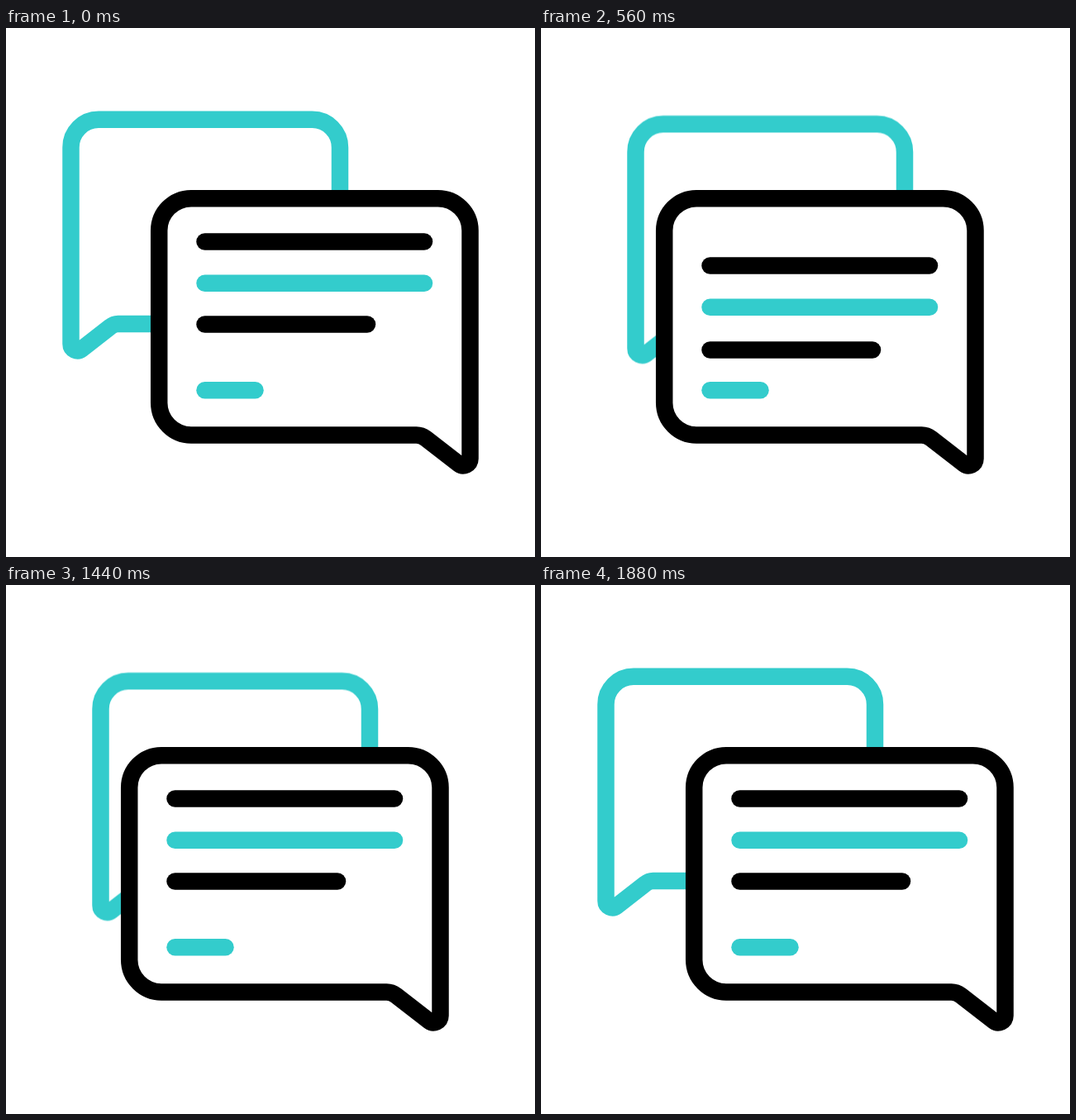
These frames come from a looping animation (640 by 640 pixels, 2 s). An HTML page without scripts:

```html
<!DOCTYPE html>
<html lang="en">
<head>
<meta charset="utf-8">
<title>Chat bubbles</title>
<style>
html, body { margin: 0; width: 100%; height: 100%; overflow: hidden; background: #fff; }
svg { display: block; width: 100vw; height: 100vh; }
path { fill: none; stroke: #000; stroke-width: 20.5; stroke-linecap: round; stroke-linejoin: round; }
.teal { stroke: #3cc; }
.bubble { fill: #fff; }

g, .line { animation: 2s cubic-bezier(.33, 0, .67, 1) infinite; }

/* Sideways slide; each bubble sets its own distance */
.slide { animation-name: slide; }
.back { --shift: translate(36px, 5.5px); }
.front { --shift: translate(-36px, 0); }
@keyframes slide {
  0%, 8%, 90%, 100% { transform: none; }
  24%, 74% { transform: var(--shift); }
}

/* Swing around the tail tip */
.swing-back { transform-origin: 78.5px 390px; animation-name: swing-back; }
.swing-front { transform-origin: 561.5px 529.5px; animation-name: swing-front; }
@keyframes swing-back {
  0%, 4%, 24%, 74%, 94%, 100% { transform: rotate(0deg); }
  12.5% { transform: rotate(8.2deg); }
  20% { transform: rotate(-5deg); }
  78% { transform: rotate(-5.2deg); }
  86% { transform: rotate(8.2deg); }
}
@keyframes swing-front {
  0%, 4%, 24%, 74%, 94%, 100% { transform: rotate(0deg); }
  12.5% { transform: rotate(-5.5deg); }
  20% { transform: rotate(7.6deg); }
  78% { transform: rotate(8.8deg); }
  86% { transform: rotate(-5.4deg); }
}

/* Lines drop in turn, rise in reverse, then ripple upwards */
.l1 { animation-name: l1; }
.l2 { animation-name: l2; }
.l3 { animation-name: l3; }
.l4 { animation-name: l4; }
@keyframes l1 {
  0%, 4%, 54%, 100% { transform: translateY(0); }
  12%, 41% { transform: translateY(29px); }
  48% { transform: translateY(-10.3px); }
}
@keyframes l2 {
  0%, 12%, 41.5%, 48.5%, 60.5%, 100% { transform: translateY(0); }
  20%, 34.5% { transform: translateY(29px); }
  54.5% { transform: translateY(-10.3px); }
}
@keyframes l3 {
  0%, 20%, 35%, 53.5%, 66%, 100% { transform: translateY(0); }
  28% { transform: translateY(31px); }
  60% { transform: translateY(-10.3px); }
}
@keyframes l4 {
  0%, 58.5%, 72%, 100% { transform: translateY(0); }
  65% { transform: translateY(-10.3px); }
}
</style>
</head>
<body>
<svg viewBox="0 0 640 640">
  <g class="slide back">
    <g class="swing-back">
      <path class="bubble teal" d="M112 110.8H370.5A33.5 33.5 0 0 1 404 144.5V324.5A33.5 33.5 0 0 1 370.5 358H135.5Q130.5 358 126 361.7L91.4 388.6A8 8 0 0 1 78.5 382.3V144.5A33.5 33.5 0 0 1 112 110.8Z"/>
    </g>
  </g>
  <g class="slide front">
    <g class="swing-front">
      <path class="bubble" d="M224 206.2H522.5A39 39 0 0 1 561.5 245V521A8.4 8.4 0 0 1 548 527.6L508 496.6Q502.5 492.4 496.5 492.4H224A39 39 0 0 1 185.2 453.5V245A39 39 0 0 1 224 206.2Z"/>
      <path class="line l1" d="M240.5 258.5H506"/>
      <path class="line l2 teal" d="M240.5 308.7H506"/>
      <path class="line l3" d="M240.5 358.5H437"/>
      <path class="line l4 teal" d="M240.5 438.2H301.5"/>
    </g>
  </g>
</svg>
</body>
</html>
```
